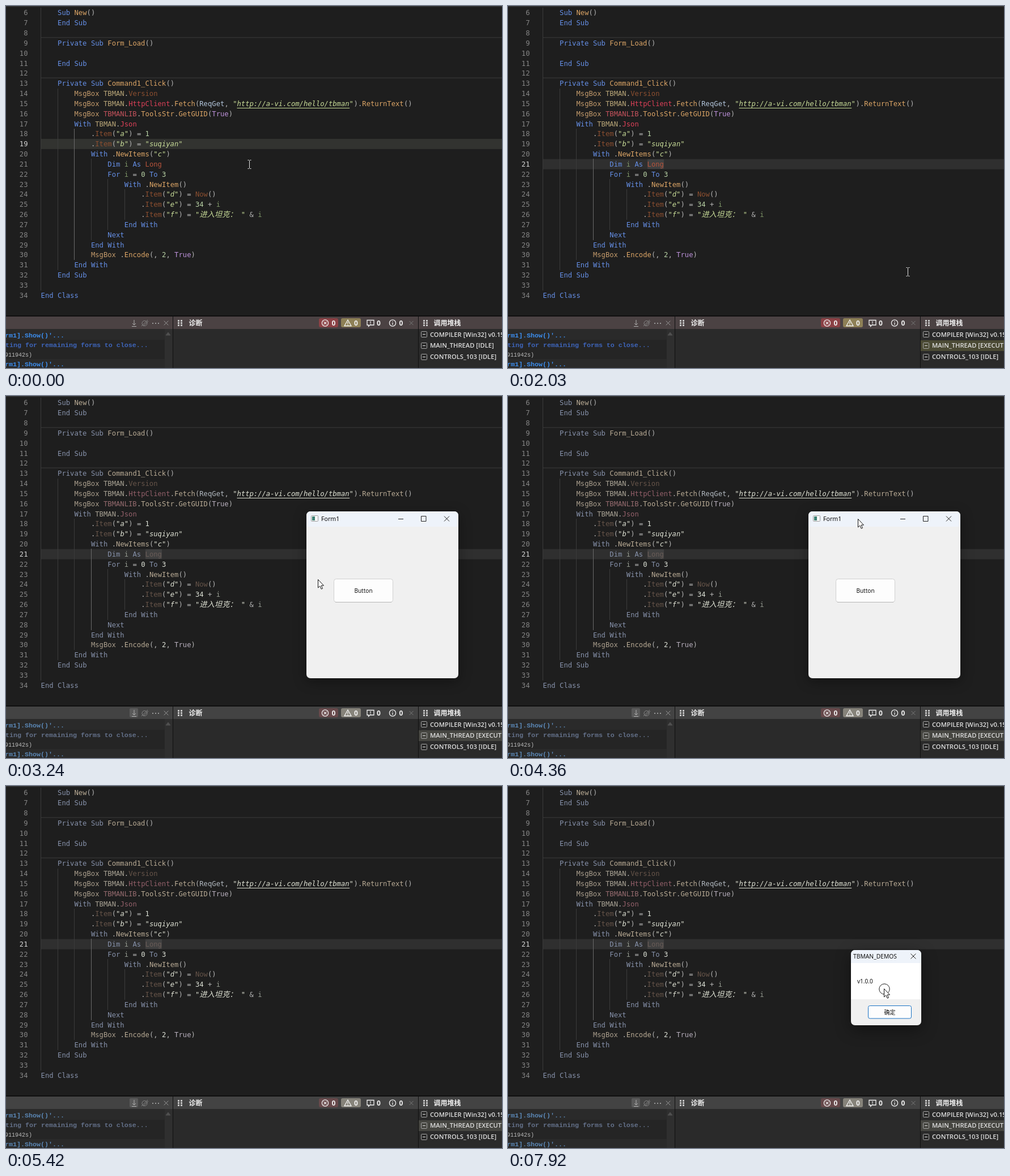
Write an HTML page with a canvas that moves like this. It is 875 px wide and 640 px high and loops after 8000 ms.

```html
<!DOCTYPE html>
<html lang="zh">
<head>
<meta charset="utf-8">
<style>
html, body { margin: 0; width: 100%; height: 100%; overflow: hidden; background: #1e1e1e; }
canvas { display: block; }
</style>
</head>
<body>
<canvas id="stage" width="875" height="640"></canvas>
<script>
const ctx = document.getElementById('stage').getContext('2d');
const LOOP = 8000, COL = 7.36, ROW = 17.84, LEFT = 62;
const MONO = '"DejaVu Sans Mono", monospace';
const CJK = '"Noto Sans CJK SC", "Noto Sans CJK", sans-serif';
const UI = '"Noto Sans", "Noto Sans CJK SC", sans-serif';

const code = `    Sub New()
    End Sub

    Private Sub Form_Load()

    End Sub

    Private Sub Command1_Click()
        MsgBox TBMAN.Version
        MsgBox TBMAN.HttpClient.Fetch(ReqGet, "http://a-vi.com/hello/tbman").ReturnText()
        MsgBox TBMANLIB.ToolsStr.GetGUID(True)
        With TBMAN.Json
            .Item("a") = 1
            .Item("b") = "suqiyan"
            With .NewItems("c")
                Dim i As Long
                For i = 0 To 3
                    With .NewItem()
                        .Item("d") = Now()
                        .Item("e") = 34 + i
                        .Item("f") = "进入坦克： " & i
                    End With
                Next
            End With
            MsgBox .Encode(, 2, True)
        End With
    End Sub

End Class`.split('\n').map(line => line.match(/"[^"]*"|\w+|[^\w"]/g) || []);

// kind: [vivid colour, muted colour, words]
const kinds = {
  keyword: ['#658fe6', '#8792ab', 'Sub End Private With Dim As For To Next Class'],
  method: ['#dca566', '#b9ab95', 'New Form_Load Command1_Click Fetch ReturnText ToolsStr GetGUID NewItems NewItem Encode'],
  call: ['#c39a6b', '#a99d8c', 'MsgBox'],
  object: ['#b9a678', '#a8a294', 'TBMAN'],
  red: ['#dc4058', '#93606a', 'HttpClient Json'],
  library: ['#c4525c', '#946a6e', 'TBMANLIB'],
  member: ['#8c4f30', '#665449', 'Version Item Now'],
  type: ['#b5533b', '#695c57', 'Long'],
  constant: ['#bd91da', '#b9b0be', 'True'],
  param: ['#b3c6dc', '#b2b9c0', 'ReqGet'],
  variable: ['#7f9668', '#969b91', 'i'],
  number: ['#b9d3a6', '#dde1d6', ''],
  string: ['#c8dc98', '#dfe2d4', ''],
  symbol: ['#b4b4b4', '#b4b4b4', '']
};
const kindOf = {};
for (const kind in kinds) for (const word of kinds[kind][2].split(' ')) kindOf[word] = kind;
const classify = token => token[0] === '"' ? 'string' : /^\d/.test(token) ? 'number' : kindOf[token] || 'symbol';

// [time, x, y, shape, pressed]
const pointer = [
  [0, 429, 280, 'beam'], [400, 429, 280, 'beam', 1], [680, 429, 280, 'beam'],
  [820, 455, 291, 'beam'], [950, 492, 305, 'beam'], [1100, 623, 437, 'beam'],
  [1250, 705, 512, 'beam'], [1370, 776, 563, 'arrow'], [1490, 790, 599, 'arrow'],
  [1640, 800, 621, 'arrow'], [1760, 804, 612, 'arrow'], [1880, 804, 598, 'arrow'],
  [2030, 705, 470, 'beam'], [2150, 603, 372, 'beam'], [2270, 551, 331, 'beam'],
  [2420, 553, 329, 'beam'], [2820, 0, 0, ''], [2970, 550, 324, 'arrow'],
  [3760, 565, 310, 'arrow'], [3910, 600, 245, 'arrow'], [4070, 612, 209, 'arrow'],
  [4360, 617, 217, 'arrow'], [4600, 613, 218, 'arrow'], [4870, 613, 218, 'arrow', 1],
  [5020, 700, 218, 'arrow', 1], [5170, 830, 230, 'arrow', 1], [5290, 0, 0, ''],
  [7020, 835, 370, 'beam'], [7170, 762, 385, 'beam'], [7290, 690, 400, 'arrow'],
  [7410, 623, 407, 'arrow'], [7560, 640, 395, 'arrow'], [7680, 654, 375, 'arrow'],
  [7800, 663, 358, 'arrow'], [7920, 663, 358, 'arrow', 1]
];
const formPlace = [[2970, 530, 204], [5020, 574, 204], [5170, 705, 216], [5290, 825, 246], [5420, 900, 260]];
const caretOn = [[0, false], [820, true], [1100, false], [1490, true], [2030, false], [2540, true], [2970, false]];
const at = (steps, t) => steps.filter(step => step[0] <= t).pop();

function rect(x, y, w, h, fill) {
  ctx.fillStyle = fill;
  ctx.fillRect(x, y, w, h);
}
function box(x, y, w, h, radius, fill, stroke) {
  ctx.beginPath();
  ctx.roundRect(x, y, w, h, radius);
  if (fill) { ctx.fillStyle = fill; ctx.fill(); }
  if (stroke) { ctx.strokeStyle = stroke; ctx.stroke(); }
}
function path(d, stroke, x = 0, y = 0, fill) {
  const shape = new Path2D(d);
  ctx.save();
  ctx.translate(x, y);
  if (fill) { ctx.fillStyle = fill; ctx.fill(shape); }
  ctx.strokeStyle = stroke;
  ctx.stroke(shape);
  ctx.restore();
}
function circle(x, y, r, stroke) {
  ctx.beginPath();
  ctx.arc(x, y, r, 0, 7);
  ctx.strokeStyle = stroke;
  ctx.stroke();
}
function text(str, x, y, color, font, align = 'left') {
  ctx.font = font;
  ctx.fillStyle = color;
  ctx.textAlign = align;
  ctx.fillText(str, x, y);
}
function cross(x, y, r, color) {
  path(`M${-r} ${-r}L${r} ${r}M${r} ${-r}L${-r} ${r}`, color, x, y);
}
function shadow(blur, drop) {
  ctx.shadowColor = 'rgba(0,0,0,.4)';
  ctx.shadowBlur = blur;
  ctx.shadowOffsetY = drop;
}
function noShadow() { ctx.shadowColor = 'transparent'; }

function drawEditor(t, muted) {
  const active = t < 400 ? 19 : 21;
  const middle = line => 12 + (line - 6) * ROW;
  rect(0, 0, 875, 2, '#303030');
  rect(0, 2, 875, 1, '#191919');
  rect(LEFT, middle(active) - 9, 813, 18, active === 19 ? '#323330' : '#2f2f2f');
  rect(LEFT, 55.3, 813, 1, '#3b3b3b');
  rect(LEFT, 126.6, 813, 1, '#3b3b3b');
  const guides = [[0, 3, 503], [1, 146, 467], [2, 217, 449], [3, 270, 414], [4, 306, 396], [5, 324, 378]];
  for (const [level, top, bottom] of guides) {
    const lit = level === (active === 19 ? 2 : 3);
    rect(Math.floor(LEFT - .2 + level * 4 * COL), top, 1, bottom - top, lit ? '#6a6a6a' : '#3b3b3b');
  }
  if (t >= 820) rect(246, 271, 29, 17, '#404040');

  code.forEach((tokens, i) => {
    const line = i + 6, y = middle(line) + 4.3;
    text(line, 38.5, y, line === active ? '#d4d4d4' : '#858585', '12.2px ' + MONO, 'right');
    let x = LEFT - .4;
    for (const token of tokens) {
      const kind = classify(token), color = kinds[kind][+muted];
      const style = kind === 'string' ? 'italic ' : '';
      if (token.startsWith('"http')) rect(x + COL, 180, (token.length - 2) * COL, 1, color);
      for (const part of token.split(/([一-鿿：]+)/)) {
        const wide = /[一-鿿]/.test(part);
        text(part, x, y, color, wide ? 'italic 13.3px ' + CJK : style + '12.2px ' + MONO);
        x += part.length * COL * (wide ? 1.8 : 1);
      }
    }
  });
  if (at(caretOn, t)[1]) rect(275, 271, 1, 17, '#c8c8c8');
}

function grip(x) {
  for (let i = 0; i < 6; i++) rect(x + (i % 2) * 5, 555 + (i >> 1) * 4, 3, 3, '#c4c4c4');
}

function drawPanels(t, muted) {
  rect(0, 547, 875, 93, '#101010');
  const panels = [[0, 294], [295, 432], [728, 147]];
  for (const [x, w] of panels) {
    rect(x, 549, w, 22, muted ? '#434343' : '#4b4243');
    rect(x, 571, w, 69, '#2a2a2a');
  }

  // output log
  rect(0, 590, 280, 34, '#252525');
  rect(280, 571, 14, 69, '#2f2f2f');
  path('M282 582L286 577L290 582Z', '#505050', 0, 0, '#505050');
  const bold = 'bold 11.67px "Liberation Mono", monospace';
  const blue = muted ? '#5b87b5' : '#3c8eef';
  text("rm1].Show()'...", -2, 585.5, blue, bold);
  text('ting for remaining forms to close...', -1, 603, muted ? '#64718a' : '#3e65bb', bold);
  text('911942s)', -2, 619.5, '#bababa', '10px "Liberation Mono", monospace');
  text("rm1].Show()'...", -2, 636.5, blue, bold);
  if (muted) box(218, 552, 15, 16, 2, '#5a5a5a');
  path('M226 555V564M223 561L226 564L229 561M222 566.5H230', '#b0b0b0');
  circle(244.5, 561, 4.5, '#858585');
  path('M239 566L250 555M242 566L251 557', '#858585');
  for (const x of [258, 263, 268]) rect(x, 560, 2, 2, '#999');
  cross(282.5, 560.5, 3.8, '#999');

  // diagnostics
  grip(303);
  text('诊断', 322.5, 564.5, '#f0f0f0', 'bold 12px ' + CJK);
  box(552, 552, 34, 16, 3, muted ? '#67494b' : '#8b4145');
  box(591, 552, 35, 16, 3, muted ? '#86837a' : '#8e8056');
  const white = '#f2f2f2';
  ctx.lineWidth = 1.3;
  circle(563, 560.5, 5.6, white);
  cross(563, 560.5, 2.4, white);
  path('M603 555L609 565.5H597Z M603 558.5V562M603 563V564.3', white);
  path('M637 555.5H649V564H642L639.5 566.5V564H637ZM643 557.5V560.5M643 561.5V562.8', white);
  circle(682, 560.5, 5.6, white);
  path('M682 559.7V563.7M682 557.2V558.5', white);
  ctx.lineWidth = 1;
  for (const x of [578, 617.5, 657.5, 697]) text('0', x, 565, white, 'bold 12px ' + UI, 'center');
  cross(715, 560.5, 3.5, '#777');

  // call stack
  grip(736);
  text('调用堆栈', 754.5, 564.5, '#f0f0f0', 'bold 12px ' + CJK);
  const running = t >= 1640;
  if (running) rect(728, 591, 147, 19, muted ? '#464641' : '#4b4a34');
  const stack = ['COMPILER [Win32] v0.15.1', `MAIN_THREAD [${running ? 'EXECUTING' : 'IDLE'}]`, 'CONTROLS_103 [IDLE]'];
  stack.forEach((label, i) => {
    const y = 580 + i * 19.8;
    box(732.5, Math.round(y) - 4.5, 10, 10, 1, null, '#a8a8a8');
    rect(735, Math.round(y), 5, 1, '#e0e0e0');
    text(label, 748, y + 4.5, '#dedede', '600 11.2px "Open Sans", sans-serif');
  });
}

function drawForm(t) {
  const [, x, y] = at(formPlace, t), filled = t >= 3090;
  ctx.save();
  ctx.translate(x, y);
  if (filled) {
    shadow(22, 5);
    box(0, 0, 268, 295, 7, '#f0f0f0');
    noShadow();
  } else {
    box(.5, .5, 267.5, 294, 7, null, '#3a3a3a');
  }
  box(0, 0, 268, 27, [7, 7, 0, 0], filled ? '#eef3fa' : '#f4f4f4');
  box(8.5, 7.5, 12, 10, 1, '#fafafa', '#9a9a9a');
  rect(10, 9, 5, 7, '#3f8175');
  text('Form1', 26, 17, '#111', '10.6px ' + UI);
  path('M162 13.5H171M202.5 8.5H211V17.5H202.5Z', '#222');
  cross(247.5, 13, 4.5, '#222');
  if (filled) {
    box(48.5, 119.5, 104, 41, 4, '#fdfdfd', '#d0d0d0');
    rect(51, 160, 99, 1, '#b5b5b5');
    text('Button', 100.5, 144, '#111', '10px ' + UI, 'center');
  }
  ctx.restore();
}

function drawDialog() {
  shadow(28, 8);
  box(605, 290, 124, 133, 7, '#f0f0f0');
  noShadow();
  box(605, 290, 124, 23, [7, 7, 0, 0], '#eef3fa');
  rect(605, 313, 124, 64, '#fff');
  text('TBMAN_DEMOS', 609, 305, '#111', '10.3px ' + UI);
  cross(715, 301, 4.5, '#222');
  text('v1.0.0', 616, 348.5, '#111', '10px ' + UI);
  box(635.5, 388.5, 76, 22.5, 3, '#fdfdfd', '#1a72c4');
  text('确定', 673.5, 403.8, '#111', '10px ' + CJK, 'center');
}

function drawPointer(t) {
  const [, x, y, shape, pressed] = at(pointer, t);
  if (pressed) circle(x + 1, y + 1, 9.2, shape === 'beam' ? '#8a8a8a' : '#1a1a1a');
  if (shape === 'beam') path('M-3 -7.5H-1L0 -6.5L1 -7.5H3M0 -6.5V6.5M-3 7.5H-1L0 6.5L1 7.5H3', '#e4e4e4', x + .5, y);
  if (shape === 'arrow') path('M0 0V14.5L3.3 11.4L5.7 16.8L8 15.8L5.6 10.6H10Z', '#111', x + .5, y + .5, '#fff');
}

function draw(now) {
  const t = now % LOOP, muted = t >= 3090;
  rect(0, 0, 875, 640, '#1e1e1e');
  drawEditor(t, muted);
  drawPanels(t, muted);
  if (t >= 2970 && t < 5420) drawForm(t);
  if (t >= 6590) drawDialog();
  drawPointer(t);
  requestAnimationFrame(draw);
}
requestAnimationFrame(draw);
</script>
</body>
</html>
```
